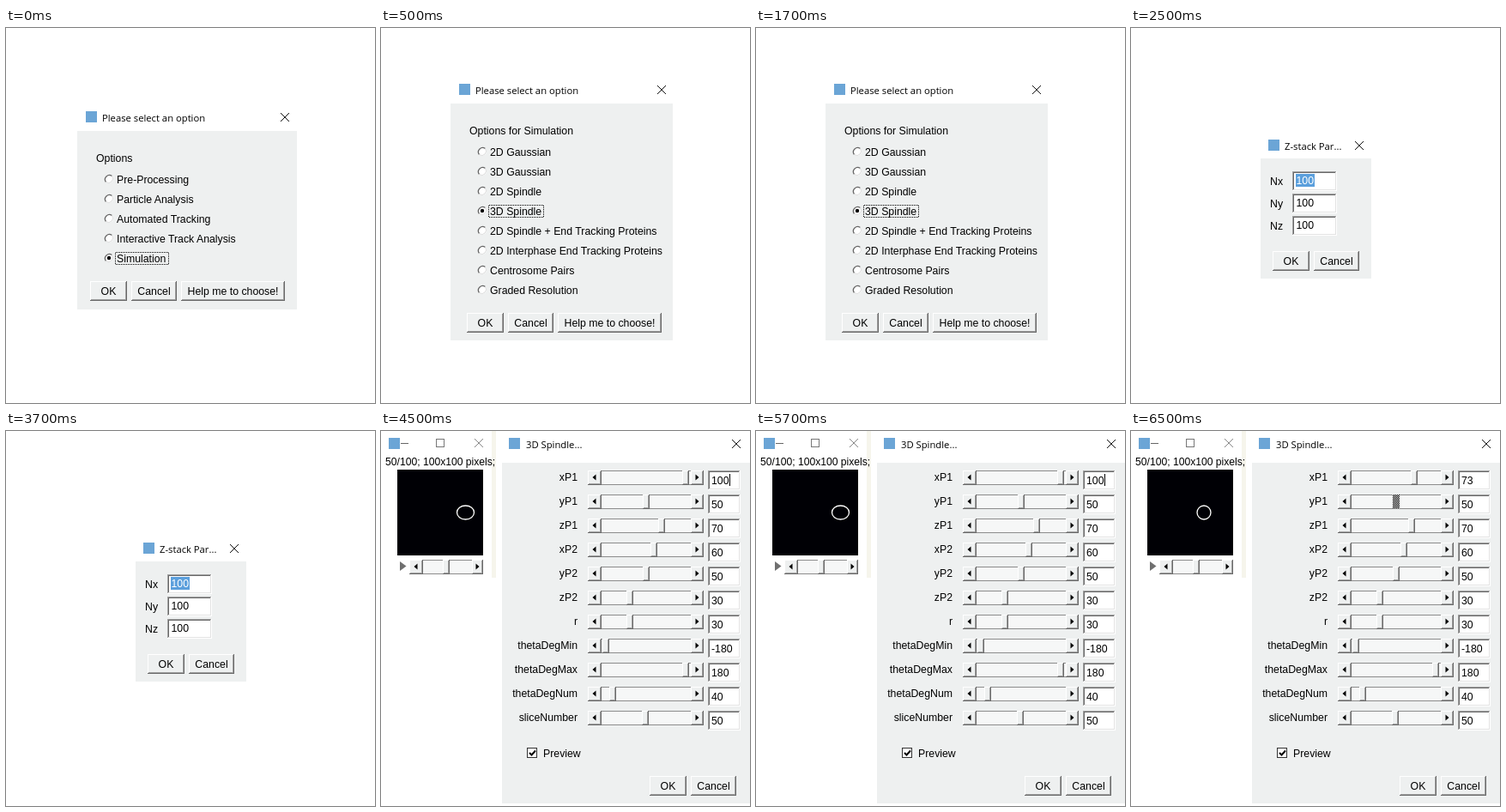
These frames come from a looping animation (430 by 437 pixels, 8 s). An HTML page:

```html
<!DOCTYPE html>
<html lang="en">
<head>
<meta charset="utf-8">
<title>Simulation dialogs</title>
<style>
html, body { margin: 0; width: 100%; height: 100%; overflow: hidden; background: #fff; }
svg { display: block; width: 100%; height: 100%; }
text { font: 12.3px "Liberation Sans", Arial, sans-serif; white-space: pre; }
.title { font: 11.25px "Open Sans", "Noto Sans", sans-serif; }
.info { font-size: 12.15px; }
rect, .focus { shape-rendering: crispEdges; }
.focus { fill: none; stroke: #000; stroke-dasharray: 1 1; }
</style>
</head>
<body>
<svg viewBox="0 0 430 437">
  <defs>
    <pattern id="hatch" width="2" height="2" patternUnits="userSpaceOnUse">
      <rect width="2" height="2" fill="#e8e8e8"/>
      <rect width="1" height="1"/><rect x="1" y="1" width="1" height="1"/>
    </pattern>
  </defs>
  <g id="scene"></g>
</svg>
<script>
const FACE = '#eef0f0', DARK = '#696969', MID = '#a0a0a0', BLUE = '#6ba5d6';

const rect = (x, y, w, h, fill, extra = '') =>
  `<rect x="${x}" y="${y}" width="${w}" height="${h}" fill="${fill}" ${extra}/>`;
const text = (x, y, s, extra = '') => `<text x="${x}" y="${y}" ${extra}>${s}</text>`;
const path = (d, stroke, width = 1, fill = 'none') =>
  `<path d="${d}" stroke="${stroke}" stroke-width="${width}" fill="${fill}"/>`;
const cross = (x, y, color) =>
  path(`M${x - 5} ${y - 5}l10 10m0-10l-10 10`, color);
const icon = (x, y) => rect(x, y, 13, 13, BLUE);

// Nested rectangles: outer bottom-right, outer top-left, inner bottom-right, inner top-left, fill
const bevel = (x, y, w, h, [a, b, c, d, e]) =>
  rect(x, y, w, h, a) + rect(x, y, w - 1, h - 1, b) +
  rect(x + 1, y + 1, w - 2, h - 2, c) + rect(x + 1, y + 1, w - 3, h - 3, d) +
  rect(x + 2, y + 2, w - 4, h - 4, e);
const raised = (x, y, w, h) => bevel(x, y, w, h, [DARK, '#fff', MID, FACE, FACE]);
const sunken = (x, y, w, h) => bevel(x, y, w, h, ['#fff', MID, '#e3e3e3', DARK, '#fff']);

const button = (x, y, w, label) =>
  raised(x, y, w, 23) + text(x + w / 2, y + 16, label, 'text-anchor="middle"');
const buttons = (x, y, help) =>
  button(x, y, 43, 'OK') + button(x + 48, y, 53, 'Cancel') +
  (help ? button(x + 106, y, 121, 'Help me to choose!') : '');

// Title strip sits above the grey panel
const dialog = (x, y, w, h, title, [ix, iy], tx, cx) =>
  rect(x, y, w, h, FACE) + icon(ix, iy) +
  text(tx, iy + 12, title, 'class="title"') + cross(cx, iy + 7, '#111');

const radio = (x, y, on) =>
  `<circle cx="${x}" cy="${y}" r="5" fill="#fff"/>` +
  path(`M${x - 3.5} ${y + 3.5}A5 5 0 0 1 ${x + 3.5} ${y - 3.5}`, '#666', 1.3) +
  path(`M${x - 3.5} ${y + 3.5}A5 5 0 0 0 ${x + 3.5} ${y - 3.5}`, '#dcdcdc') +
  (on ? `<circle cx="${x}" cy="${y}" r="2.2"/>` : '');

// Both halves run right and down so their dots fall on whole pixels
const focusBox = (x, y, w, h) =>
  `<path class="focus" d="M${x} ${y}h${w}v${h}M${x} ${y}v${h}h${w}"/>`;

const radios = (x, y, labels, chosen, focusWidth) => labels.map((s, i) => {
  const cy = y + 23 * i, on = i === chosen;
  return radio(x, cy, on) + text(x + 9, cy + 5, s) +
    (on ? focusBox(x + 7.5, cy - 6.5, focusWidth, 14) : '');
}).join('');

const arrow = (x, y, dir) =>
  path(`M${x - 2 * dir} ${y - 3.5}v7l${4 * dir}-3.5z`, 'none', 0, '#000');

const scrollbar = (x, y, w, end, thumb, held) =>
  rect(x, y, w, 17, '#8c8c8c') + rect(x + 16, y + 1, w - 16 - end, 15, '#f6f7f7') +
  raised(x, y, 16, 17) + raised(x + w - end, y, end, 17) +
  arrow(x + 7.5, y + 8, -1) + arrow(x + w - end / 2, y + 8, 1) +
  (held ? rect(thumb, y, 8, 16, 'url(#hatch)') : raised(thumb, y, 8, 17));

function mainMenu() {
  return dialog(83, 120, 256, 208, 'Please select an option', [93, 97], 112, 325) +
    text(105, 156, 'Options') +
    radios(120, 176, ['Pre-Processing', 'Particle Analysis', 'Automated Tracking',
      'Interactive Track Analysis', 'Simulation'], 4, 62) +
    buttons(98, 295, true);
}

function simulationMenu() {
  return dialog(81, 88, 259, 276, 'Please select an option', [91, 65], 110, 327) +
    text(103, 124, 'Options for Simulation') +
    radios(118, 144, ['2D Gaussian', '3D Gaussian', '2D Spindle', '3D Spindle',
      '2D Spindle + End Tracking Proteins', '2D Interphase End Tracking Proteins',
      'Centrosome Pairs', 'Graded Resolution'], 3, 64) +
    buttons(100, 332, true);
}

function stackSize() {
  const fields = ['Nx', 'Ny', 'Nz'].map((s, i) => {
    const y = 167 + 26 * i;
    return text(162, y + 16, s) + sunken(188, y, 52, 23) +
      (i ? '' : rect(192, y + 3, 22, 15, '#5b9fdc')) +
      text(192.5, y + 15, '100', i ? '' : 'fill="#fff"');
  });
  return dialog(151, 152, 129, 140, 'Z-stack Par...', [160, 130], 179, 266) +
    fields.join('') + buttons(165, 260);
}

function preview(cx, rx) {
  return rect(129, 0, 5, 171, '#f6f5ec') + icon(9, 8) +
    path('M23 14.5h9', '#666') + rect(64.5, 9.5, 9, 9, 'none', 'stroke="#777"') +
    cross(114, 14, '#888') +
    text(5, 40, '50/100; 100x100 pixels;', 'class="info"') +
    rect(19, 45, 100, 100, '#000005') +
    `<ellipse cx="${cx}" cy="95" rx="${rx}" ry="8" fill="none" stroke="#fff" stroke-width="1.3"/>` +
    path('M22 152v11l7.5-5.5z', 'none', 0, '#707070') +
    scrollbar(33, 150, 86, 13, 72);
}

// Name, value, thumb position in percent
const params = xP1 => [
  ['xP1', xP1, xP1], ['yP1', 50, 50], ['zP1', 70, 70],
  ['xP2', 60, 60], ['yP2', 50, 50], ['zP2', 30, 30], ['r', 30, 30],
  ['thetaDegMin', -180, 0], ['thetaDegMax', 180, 100],
  ['thetaDegNum', 40, 9], ['sliceNumber', 50, 49]
];

function spindle(xP1, dragging) {
  const rows = params(xP1).map(([name, value, pos], i) => {
    const y = 46 + 28 * i;
    return text(229, y + 12, name, 'text-anchor="end"') +
      scrollbar(241, y, 135, 15, Math.round(258 + 0.93 * pos), dragging && i === 1) +
      sunken(381, y, 38, 23) + text(385, y + 16, value);
  });
  return preview(dragging ? 85 : 98.5, dragging ? 8 : 10) +
    dialog(141, 37, 289, 397, '3D Spindle...', [149, 8], 169, 414) + rows.join('') +
    (dragging ? '' : rect(406, 50, 1, 14, '#000')) +
    rect(170.5, 369.5, 11, 11, '#fff', 'stroke="#333"') +
    path('M173 375l2.5 2.5 4.5-5', '#000', 2) +
    text(189, 380, 'Preview') + buttons(313, 402);
}

const steps = [
  [0, mainMenu], [500, simulationMenu], [2500, stackSize],
  [4500, () => spindle(100, false)], [6500, () => spindle(73, true)]
];
const scene = document.getElementById('scene');
const start = performance.now();
let shown;

function tick() {
  const t = (performance.now() - start) % 8000;
  const [, draw] = steps.findLast(([from]) => t >= from);
  if (draw !== shown) scene.innerHTML = (shown = draw)();
  requestAnimationFrame(tick);
}
tick();
</script>
</body>
</html>
```
